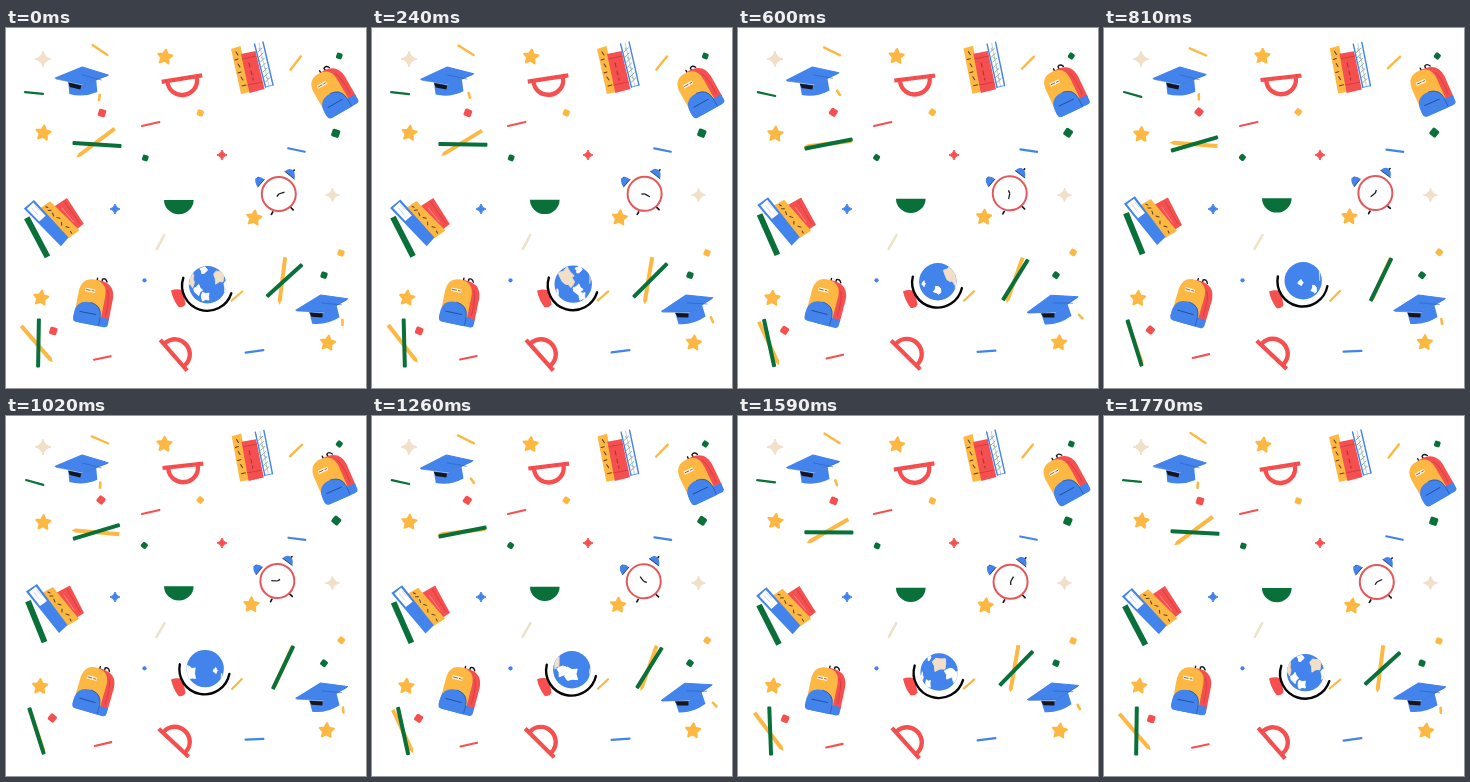
Write an HTML page that moves like this. It is 360 by 360 pixels and loops after 1.8 s.

```html
<!DOCTYPE html>
<html lang="en">
<head>
<meta charset="utf-8">
<title>School supplies</title>
<style>
  html, body { margin: 0; width: 100%; height: 100%; overflow: hidden; background: #fff; }
  svg { display: block; width: 100vw; height: 100vh; }
</style>
</head>
<body>
<svg id="stage" viewBox="0 0 360 360"></svg>
<script>
const LOOP = 1800, STEP = 30;
const BLUE = '#4283ec', RED = '#f5504f', GOLD = '#fdb843', GREEN = '#087038',
      CREAM = '#f1dfc8', INK = '#15151c';
const stage = document.getElementById('stage');
const parts = [];

function group(markup, parent = stage) {
  const g = document.createElementNS('http://www.w3.org/2000/svg', 'g');
  g.innerHTML = markup;
  return parent.appendChild(g);
}

// A part sways from its rest pose by `swing` degrees and (dx, dy), then back,
// `beats` times in each loop.
function part(markup, x, y, angle = 0, swing = 0, dx = 0, dy = 0, beats = 1) {
  const el = group(markup);
  parts.push({ el, x, y, angle, swing, dx, dy, beats });
  return el;
}

const path = (d, fill) => `<path d="${d}" fill="${fill}"/>`;
const line = (d, color, w) =>
  `<path d="${d}" fill="none" stroke="${color}" stroke-width="${w}" stroke-linecap="round" stroke-linejoin="round"/>`;
const shift = (x, y, markup) => `<g transform="translate(${-x} ${-y})">${markup}</g>`;

function stick(color, len, w, ...pose) {
  const h = len / 2;
  part(`<rect x="${-h}" y="${-w / 2}" width="${len}" height="${w}" rx="1" fill="${color}"/>`, ...pose);
}

function pencil(...pose) {
  part(path('M-24 0 L-20 -2 H24 V2 H-20Z', GOLD), ...pose);
}

function star(x, y, dx, dy) {
  let d = '';
  for (let i = 0; i < 10; i++) {
    const r = i % 2 ? 3.8 : 7.5, a = i * Math.PI / 5 - Math.PI / 2;
    d += (i ? 'L' : 'M') + (r * Math.cos(a)).toFixed(2) + ' ' + (r * Math.sin(a)).toFixed(2);
  }
  part(`<path d="${d}Z" fill="${GOLD}" stroke="${GOLD}" stroke-width="2" stroke-linejoin="round"/>`, x, y, 8, -5, dx, dy);
}

function sparkle(color, r, x, y) {
  const k = r * 0.17;
  part(`<path d="M0 ${-r} Q${k} ${-k} ${r} 0 Q${k} ${k} 0 ${r} Q${-k} ${k} ${-r} 0 Q${-k} ${-k} 0 ${-r}Z"
    fill="${color}" stroke="${color}" stroke-linejoin="round"/>`, x, y);
}

function chip(color, size, x, y, dx = 0, dy = 0) {
  const h = size / 2;
  part(`<rect x="${-h}" y="${-h}" width="${size}" height="${size}" rx="1.6" fill="${color}"/>`, x, y, 18, 22, dx, dy);
}

const tassels = [];
function cap(x, y, angle) {
  const el = part(
    path('M-13 1 L-12 13 Q2 17 16 11 L15 -1 L1 4Z', BLUE) +
    path('M-13 1.5 L0 4.5 L-1 8.5 L-11.5 6Z', INK) +
    `<path d="M-26 -3 L1 -14 L27 -6 L2 3Z" fill="${BLUE}" stroke="${BLUE}" stroke-linejoin="round"/>` +
    line('M-25 -2 L2 3.6 L26 -5.2 M1 -6 L20 -1', '#2c61bd', 0.6), x, y, angle, -6, -0.8, 0, 2);
  tassels.push(group(line('M0 4 V9', GOLD, 2.6), el));
}

// Drawn upright with the middle of its base at the pivot.
function backpack(...pose) {
  part(
    line('M-1 -44 V-47 M4 -44 V-47 Q7 -49 9 -45', INK, 1.4) +
    path('M-3 -45 Q17 -47 18 -30 V-7 H6 V-30 Q7 -41 -3 -45Z', RED) +
    line('M11 -37 Q15 -31 14 -12', '#d33d42', 0.8) +
    path('M-17 -8 V-32 Q-16 -45 -4 -45 Q10 -45 10 -30 V-8Z', GOLD) +
    path('M-17.5 -9 H18 V-3 Q18 0 14 0 H-14 Q-17.5 0 -17.5 -4Z', BLUE) +
    path('M-17.5 -4 V-11 Q-16 -22 -4 -22 Q9 -22 9 -9 V0 H-14Z', BLUE) +
    line('M9 -1 V-10 Q8 -21 -3 -22', '#2659b0', 0.7) +
    line('M-12 -11 H4', '#1d3f80', 0.7) +
    path('M-11 -35.5 H-1 V-32 H-11Z', '#fff3df') +
    line('M-10 -33.7 H-6 M-4 -33.7 H-2', '#6f5526', 0.8), ...pose);
}

function protractor(...pose) {
  part(`<path fill-rule="evenodd" fill="${RED}" d="M-20.5 -2.5 H20.5 V1.7 H17 A17 16.5 0 0 1 -17 1.7 H-20.5Z
    M-12.7 1.7 A12.7 12 0 0 0 12.7 1.7Z"/>` +
    line('M-16 -1.4 V0 M-8 -1.4 V0 M0 -1.4 V0 M8 -1.4 V0 M16 -1.4 V0', '#c53a3f', 0.5), ...pose);
}

// Caps, sticks and confetti
sparkle(CREAM, 8, 37, 31);
sparkle(CREAM, 7, 326.5, 167);
sparkle(RED, 5, 216, 127);
sparkle(BLUE, 5, 109, 181);
part(`<circle r="2.1" fill="${BLUE}"/>`, 138.5, 252.3);

stick(GOLD, 20, 2.4, 94, 22, 34, -11, 0, 2);
stick(GREEN, 20, 2.2, 28, 65, 5, 11, 0.7, 1.5);
stick(RED, 20, 2, 144.7, 96, -13);
stick(BLUE, 19, 2.2, 290.5, 122, 12, -5, 0.4, 0.8);
stick(GOLD, 19, 2.4, 289.7, 35, -52, 9, 0.3, -0.5);
stick('#ece3c8', 18, 2.6, 154.5, 214, -62, 2);
stick(RED, 19, 2.2, 96.3, 330, -12, -1, 0.7, -2);
stick(BLUE, 20, 2.2, 248.5, 323.3, -8, 6);
stick(GOLD, 16, 2.2, 231, 268, -40, -5);

chip(RED, 7.5, 96, 85, -1, -1);
chip(RED, 7.5, 47.3, 303, -1, -1);
chip(GREEN, 6, 139.3, 130, -1, -0.6);
chip(GREEN, 6, 333.3, 28);
chip(GREEN, 8, 329.7, 105.3, 0.6, -0.8);
chip(GREEN, 6.5, 318, 247.2);
chip(GOLD, 6.5, 194.3, 85, 0, -1);
chip(GOLD, 6.5, 335, 225, 0.3, -0.8);

star(37.3, 105, 0, 1.6);
star(159, 29, -0.7, -0.8);
star(248, 190, -2.8, -1.2);
star(35, 270, -1, 0.5);
star(321.8, 315, -1.2, -0.4);

cap(75.3, 53, 0);
cap(316, 281, -9);

// Pencil and ruler pairs
pencil(89.5, 115, -37, 43, 0, 1.3);
stick(GREEN, 49, 4, 91, 116.5, 3.5, -20.7, -0.6, -0.6);
pencil(31, 316, 229, 23, 0, -0.7);
stick(GREEN, 49, 4, 32.5, 315, 91, -19, -2, 0);
pencil(276.2, 253, -83, 18, 0.6, -1);
stick(GREEN, 48, 4, 278.5, 252.5, -42, -23, -1.5, -1);

// Books, left
part(shift(48, 198,
  path('M48 178 L64 169.5 L78 197 L64 206Z', RED) +
  line('M51 180 L66 203 M61 173 L74 196', '#c53a3f', 0.7) +
  line('M58 179 L68 194', '#ffaaa5', 0.6) +
  path('M36 177 L47 171 L73 203 L61 210Z', GOLD) +
  line('M42 176 l2 1 M44 180 l3 0 M48 183 l1 3 M52 188 l3 1 M56 193 l0 3 M60 198 l3 1 M64 203 l1 2', '#58401f', 1) +
  path('M20 175.5 L31 168 L61.5 209 L53 217Z', BLUE) +
  path('M23 176 L30 170.5 L41 185 L34 190Z', '#fff') +
  line('M28 176 l5 7 M31 174 l4 5', '#b8c9e8', 0.7) +
  `<path d="M22 185 L38.5 226" stroke="${GREEN}" stroke-width="6"/>`
), 48, 200, -6, 6, 0, -2);

// Books, top
part(shift(246, 40,
  path('M225 21 L234.5 18 L244 64 L235 66Z', GOLD) +
  line('M230 24 l2 3 M229 32 l3 -1 M232 36 l2 3 M232 45 l3 -1 M235 49 l2 3 M236 58 l4 -1', '#58401f', 1) +
  path('M235 26 L249.5 23 L258.5 61 L243.5 65Z', RED) +
  line('M237 31 L250 28 M242 57 L256 54', '#c53a3f', 0.8) +
  line('M243 35 l1 4 M245 43 l1 4 M247 50 l0 2', '#a3383b', 1.1) +
  path('M248 16 L257 13.5 L267 57 L259 60Z', '#fff') +
  line('M252 24 l4 -4 M253 29 l4 -4 M254.5 34 l4 -4 M255.5 39 l4 -4 M257 44 l4 -4 M258 49 l4 -4 M259.5 54 l4 -4', '#78a98c', 0.9) +
  line('M253 20 l1 2 M255 29 l2 2 M258 39 l2 2 M260 49 l2 2', '#d8b34f', 1) +
  line('M248.5 16 L259.5 59 M257 14 L267 57', BLUE, 1.4) +
  line('M253 15 L263 58', '#8fb0ea', 0.6) +
  line('M259.5 59 L267 57', BLUE, 0.8)
), 246, 40, 0, 2);

backpack(338, 83, -30, 6.5, -2, -0.2);
backpack(83.6, 296.5, 11, 5.3, -1.4, -0.5);

protractor(176, 51, -9, 3, 1, -0.8);
protractor(168, 327, 229, -6, 0, -0.5);

part(path('M158 172 H187.6 A14.8 14.3 0 0 1 158 172Z', GREEN), 0, 0, 0, 0, 0, -1.8);

// Alarm clock
part(
  line('M-6 18 l-1.4 2.4 M12 13.5 l2.4 2.4', INK, 1.7) +
  line('M13.5 -22 l2 -2 M-22 -15 l1.5 -1.5', INK, 1.6) +
  path('M-23.5 -15.5 Q-18.5 -19 -14.5 -14.5 L-21 -7Q-24 -10 -23.5 -15.5Z', BLUE) +
  path('M6 -22.5 Q10 -27 14.5 -23.5 Q17 -20 15.5 -15Z', BLUE) +
  line('M-21 -7 L-14.5 -14.5 M6 -22.5 L15.5 -15', INK, 0.7) +
  `<circle r="17" fill="#fff" stroke="#e4585c" stroke-width="2"/>` +
  `<path id="minute" d="M0 0 V-6" stroke="${INK}" stroke-width="1.2"/>` +
  `<path id="hour" d="M0 0 V-3.2" stroke="${INK}" stroke-width="1.3"/>`,
  272.8, 166, 0, -2, -1.5, -1);

// Globe
part(path('M165 262.5 Q171 260 177 262.5 L179.5 276 Q177 280 172.5 279 Q167 272 165 262.5Z', RED), 0, 0, 0, 0, 0, 1);
part(line('M-24 -7.5 A25 25 0 1 0 24 8', '#050505', 2.4), 201.3, 257.3, 0, -7, -2.8, -4.5);
part(`<clipPath id="ball"><circle r="18.7"/></clipPath><circle r="18.7" fill="${BLUE}"/>
  <g id="land" clip-path="url(#ball)"></g>`, 201.5, 256.7, 0, 0, -2.4, -4.2);

// Land patches: longitude, latitude, size, colour
const lands = [
  [42, 25, 8, CREAM], [-75, 27, 9, CREAM], [-58, 8, 6, CREAM], [106, -14, 8, '#fff'],
  [76, -4, 6.5, '#fff'], [-33, -17, 5.5, '#fff'], [-120, -27, 4.5, '#fff'],
  [-10, -40, 5, '#fff'], [-20, 52, 4, '#fff'], [-170, -6, 3, '#fff']
].map(([lon, lat, size, color], i) => {
  let d = '';
  for (let k = 0; k < 9; k++) {
    const a = k * Math.PI * 2 / 9, r = size * (0.82 + 0.24 * Math.sin(k * 2.6 + i * 1.7));
    d += (k ? 'L' : 'M') + (r * Math.cos(a)).toFixed(1) + ' ' + (r * Math.sin(a)).toFixed(1);
  }
  const el = group(`<path d="${d}Z" fill="${color}" stroke="${color}" stroke-linejoin="round"/>`,
    document.getElementById('land'));
  return { el, lon, lat: lat * Math.PI / 180 };
});

const minute = document.getElementById('minute');
const hour = document.getElementById('hour');

const wave = (t, beats) => Math.cos((t - 30) / LOOP * Math.PI * 2 * beats);

function draw(now) {
  const t = Math.floor((now % LOOP) / STEP) * STEP;
  const turn = t / LOOP * 360;
  for (const p of parts) {
    const d = (1 - wave(t, p.beats)) / 2;
    p.el.setAttribute('transform',
      `translate(${p.x + p.dx * d} ${p.y + p.dy * d}) rotate(${p.angle + p.swing * d})`);
  }

  const sway = wave(t, 2);
  for (const el of tassels) {
    el.setAttribute('transform', `translate(${20.5 - sway * 1.6} ${9 + sway}) rotate(${-14 + sway * 22})`);
  }

  minute.setAttribute('transform', `rotate(${72 + turn})`);
  hour.setAttribute('transform', `rotate(${217 + turn})`);

  for (const { el, lon, lat } of lands) {
    const a = (lon + turn) * Math.PI / 180, depth = Math.cos(a);
    el.setAttribute('visibility', depth > 0 ? 'visible' : 'hidden');
    el.setAttribute('transform',
      `translate(${18.5 * Math.cos(lat) * Math.sin(a)} ${-18.5 * Math.sin(lat)}) scale(${Math.max(depth, 0.05)} 1)`);
  }
}

const start = performance.now();
function tick() {
  draw(performance.now() - start);
  requestAnimationFrame(tick);
}
draw(0);
requestAnimationFrame(tick);
</script>
</body>
</html>
```
